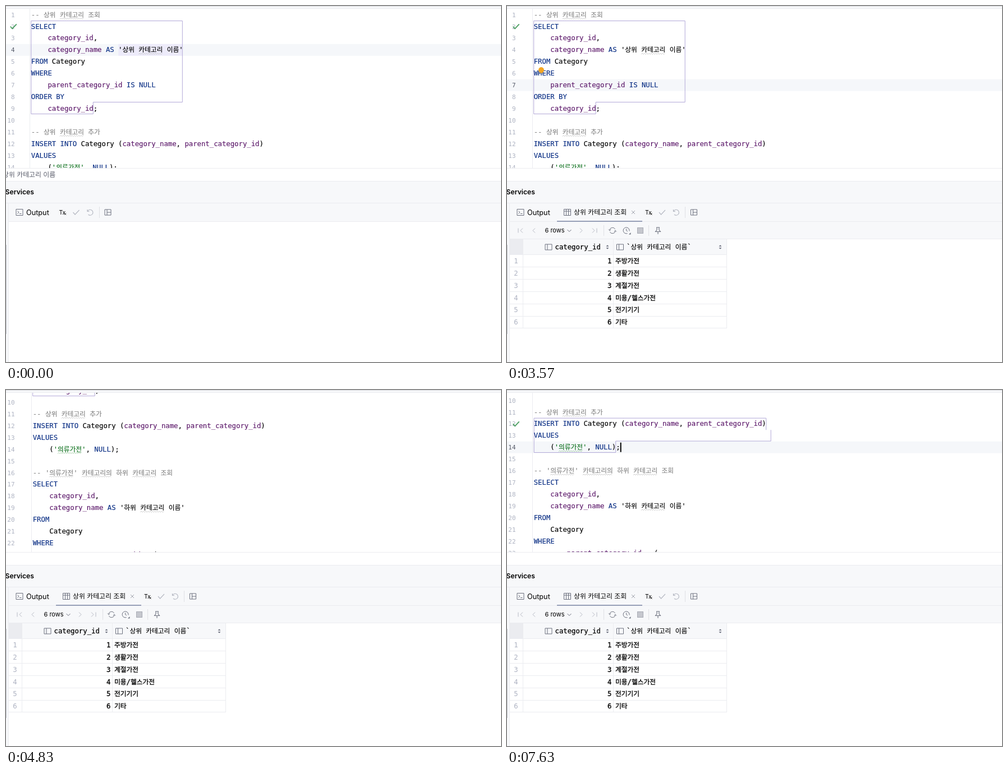
Recreate the animation shown at these times as an HTML page with a canvas. Size 882 by 635 pixels, loop 8 s.

```html
<!DOCTYPE html>
<html lang="ko">
<head>
<meta charset="utf-8">
<style>
  html, body { margin: 0; width: 100%; height: 100%; overflow: hidden; background: #fff; }
  canvas { display: block; }
</style>
</head>
<body>
<canvas id="stage" width="882" height="635"></canvas>
<script>
const ctx = document.getElementById('stage').getContext('2d');

const LOOP = 8000, STEP = 70;
const LINE_HEIGHT = 20.92, EDITOR_TOP = 5, EDITOR_BOTTOM = 289, SCROLL_END = 185.3;
const PANEL = '#f7f8fa', BORDER = '#ebecf0', MUTED = '#b7bac4', ICON = '#6c707e';
const KEYWORD = '#0b2f85', COLUMN = '#5d1a6b', STRING = '#0a6e1a', COMMENT = '#858585';
const SELECTION = '#cacaff', FRAME = '#b3a9d8';
const MONO = '12.29px "DejaVu Sans Mono", monospace';
const LINE_NUMBER = '11px "DejaVu Sans Mono", monospace';
const HANGUL = '11.7px "Noto Sans CJK KR", "Noto Sans CJK", sans-serif';
const UI = 'Inter, "Noto Sans CJK KR", sans-serif';

const code = `-- 상위 카테고리 조회
SELECT
    category_id,
    category_name AS '상위 카테고리 이름'
FROM Category
WHERE
    parent_category_id IS NULL
ORDER BY
    category_id;

-- 상위 카테고리 추가
INSERT INTO Category (category_name, parent_category_id)
VALUES
    ('의류가전', NULL);

-- '의류가전' 카테고리의 하위 카테고리 조회
SELECT
    category_id,
    category_name AS '하위 카테고리 이름'
FROM
    Category
WHERE
        parent_category_id = (`.split('\n');
const rows = ['주방가전', '생활가전', '계절가전', '미용/헬스가전', '전기기기', '기타'];

const clamp = v => Math.min(1, Math.max(0, v));
const between = (t, a, b) => t >= a && t < b;
const lineTop = n => 5.05 + (n - 1) * LINE_HEIGHT;

function rect(x, y, w, h, color) {
  ctx.fillStyle = color;
  ctx.fillRect(x, y, w, h);
}

function stroke(d, color = ICON, x = 0, y = 0, width = 1) {
  ctx.save();
  ctx.translate(x, y);
  ctx.strokeStyle = color;
  ctx.lineWidth = width;
  ctx.stroke(new Path2D(d));
  ctx.restore();
}

function fill(d, color, x = 0, y = 0) {
  ctx.save();
  ctx.translate(x, y);
  ctx.fillStyle = color;
  ctx.fill(new Path2D(d));
  ctx.restore();
}

// A positive `bold` thickens the glyphs by that many pixels.
function label(text, x, y, font, color = '#000', align = 'left', bold = 0) {
  ctx.font = font;
  ctx.fillStyle = ctx.strokeStyle = color;
  ctx.textAlign = align;
  ctx.fillText(text, x, y);
  if (bold) {
    ctx.lineWidth = bold;
    ctx.strokeText(text, x, y);
  }
  ctx.textAlign = 'left';
}

// Draws Latin and Hangul runs in their own fonts and returns the end position.
function monoText(text, x, y, color = '#000', bold = 0) {
  for (const run of text.match(/[가-힣]+|[^가-힣]+/g) || []) {
    const hangul = /[가-힣]/.test(run);
    label(run, x, y, hangul ? HANGUL : MONO, color, 'left', bold);
    const end = x + ctx.measureText(run).width;
    if (hangul && ctx.underlined && /^(카테고리의?|의류가전)$/.test(run)) {
      wave(x, end, y + 2.8, color === STRING ? '#9ccaa0' : '#c4c4c4');
    }
    x = end;
  }
  return x;
}

function wave(x, end, y, color) {
  let d = `M${x} ${y + 1}`;
  for (let i = 1; x + i * 2 <= end; i++) d += `L${x + i * 2} ${y + (i % 2 ? -1 : 1)}`;
  stroke(d, color, 0, 0, .9);
}

function tokenColor(token, line) {
  if (token.startsWith('--')) return COMMENT;
  if (token[0] === "'") return line.includes(' AS ') ? '#000' : STRING;
  if (/^[A-Z]{2,}$/.test(token)) return KEYWORD;
  return /^[a-z]+_/.test(token) ? COLUMN : '#000';
}

function codeLine(line, x, y) {
  for (const token of line.match(/--.*|'[^']*'|\w+|\s+|./g) || []) {
    x = monoText(token, x, y, tokenColor(token, line), .15);
  }
}

function selection(x, first, last, width) {
  rect(x, lineTop(first), 882 - x, (last - first) * LINE_HEIGHT, SELECTION);
  rect(x, lineTop(last), width, LINE_HEIGHT - .5, SELECTION);
}

function editor(t, x) {
  const scroll = SCROLL_END * (1 - (1 - clamp((t - 4060) / 980)) ** 2.59);
  const activeLine = t < 980 ? 4 : t < 6090 ? 7 : 14;
  const secondFrame = t >= 6440;
  const firstSelected = between(t, 2170, 2730), secondSelected = between(t, 6650, 7560);

  ctx.save();
  ctx.beginPath();
  ctx.rect(0, EDITOR_TOP, 882, EDITOR_BOTTOM - EDITOR_TOP);
  ctx.clip();
  ctx.translate(0, -scroll);

  rect(0, lineTop(activeLine), 882, LINE_HEIGHT, '#f5f7fa');
  if (activeLine === 4) rect(x + 155.5, lineTop(4), 114, LINE_HEIGHT, '#edebfa');
  rect(Math.round(x - 3), 0, 1, 600, BORDER);
  if (firstSelected) selection(x, 2, 9, 110.5);
  if (secondSelected) selection(x, 12, 14, 146);

  const frameColor = firstSelected || secondSelected ? '#b9b1e6' : FRAME;
  if (secondFrame) {
    stroke('M414 256.5V235.5H.5V296.8H146V276.4H422.5V256.5', frameColor, x, 0);
  } else {
    stroke('M0 26.5H269.5V171.5H110.5V192.5H0Z', frameColor, x, 0);
  }

  ctx.underlined = true;
  code.forEach((line, i) => {
    const y = lineTop(i + 1) + 14.6;
    label(i + 1, 15.5, y, LINE_NUMBER, i + 1 === activeLine ? '#555a68' : '#aeb3c2', 'right');
    codeLine(line, x, y);
  });
  ctx.underlined = false;

  const checked = t < 7560 ? 2 : 12;
  stroke('M-5 0L-1.5 4L6 -4', '#4c9f62', x - 32, lineTop(checked) + 10.5, 1.8);

  if (between(t, 2100, 2170) || between(t, 3570, 6440)) {
    fill('M-3 3.5A5 5 0 1 1 3 3.5L2.5 5H-2.5Z', '#f5a623', x + 13.3, 114.5);
    rect(x + 11.3, 119.5, 4, 1.5, '#8c8c8c');
  }
  if (between(t, 2730, 3220) || between(t, 3780, 4130)) {
    rect(x + 222, lineTop(7) + 2, 2, 17, '#000');
  }
  if (between(t, 6090, 6440) || t >= 7560) {
    rect(x + 154, lineTop(14) + 2, 2, 17, '#000');
  }
  ctx.restore();
}

function pointer(t) {
  let x, y;
  if (between(t, 210, 1960)) {
    const rest = (1 - clamp((t - 210) / 770)) ** 2;
    x = 264.5 + 35 * rest;
    y = 141 + 495 * rest;
  } else if (between(t, 5460, 6440)) {
    const u = clamp((t - 5460) / 630), v = 1 - u;
    x = v * v * 331 + 2 * u * v * 301 + u * u * 202;
    y = v * v * 200 + 2 * u * v * 67 + u * u * 102;
  } else return;
  if (y > EDITOR_BOTTOM - 9) return;
  const beam = 'M-3.5 -7.5Q0 -7.5 0 -5.5Q0 -7.5 3.5 -7.5M0 -5.5V5.5M-3.5 7.5Q0 7.5 0 5.5Q0 7.5 3.5 7.5M-2 2.5H2';
  stroke(beam, '#fff', x, y, 3);
  stroke(beam, '#111', x, y, 1.3);
}

function panel(hasResult) {
  rect(0, 0, 882, 4, PANEL);
  rect(0, 0, 882, 1, '#dcdde0');
  rect(0, 4, 882, 1, BORDER);
  rect(0, 289, 882, 1, BORDER);
  rect(0, 312, 882, 73, PANEL);
  for (const y of [312, 351, 384]) rect(0, y, 882, 1, BORDER);
  rect(0, 352, 4, 283, PANEL);
  rect(4, 352, 1, 283, BORDER);
  rect(0, 426, 1, 159, '#c3c6cd');

  label('Services', -1.5, 336.3, '600 12.2px ' + UI);
  stroke('M-6 -5.5H6V5.5H-6ZM-3.5 -2.5L-1 0L-3.5 2.5M0 2.5H3.5', ICON, 24, 368);
  label('Output', 36, 372.5, '12.7px ' + UI);

  const shift = hasResult ? 151.5 : 0;
  label('Tx', 94.5 + shift, 372, '10.5px ' + UI);
  stroke('M0 0L3 3M3 0L0 3', '#222', 104 + shift, 369.5);
  stroke('M-5.5 0L-2 4L5.5 -4', MUTED, 125 + shift, 368, 1.2);
  stroke('M-5 -5V-1.5H-1.5M-4.7 -1.8A5 5 0 1 1 -3.5 4', MUTED, 150 + shift, 368, 1.2);
  rect(Math.round(165.5 + shift), 358, 1, 20, '#dfe1e5');
  stroke('M-5.5 -5H5.5V5H-5.5ZM-1.5 -5V5M-1.5 0H5.5', ICON, 181.5 + shift, 368);
}

function sorter(x) {
  fill('M-2.5 -1L0 -3.8L2.5 -1ZM-2.5 1L0 3.8L2.5 1Z', '#6c707e', x, 430);
}

function results() {
  stroke('M-6 -5.5H6V5.5H-6ZM-6 -2H6M-2 -5.5V5.5M2 -5.5V5.5', ICON, 107.5, 368);
  label('상위 카테고리 조회', 119, 372, '11.9px ' + UI);
  stroke('M-3 -3L3 3M3 -3L-3 3', '#a0a3ad', 225, 368);
  rect(89, 383, 152, 2, '#979fb8');

  rect(5, 385, 877, 30, PANEL);
  rect(5, 415, 877, 1, BORDER);
  stroke('M-4 -4V4M4 -4L0 0L4 4', MUTED, 24, 400.5);
  stroke('M2 -4L-2 0L2 4', MUTED, 48, 400.5);
  label('6 rows', 67.5, 404.3, '11px ' + UI);
  stroke('M-3.5 -1.5L0 2L3.5 -1.5', ICON, 111, 400.5);
  stroke('M-2 -4L2 0L-2 4', MUTED, 132, 400.5);
  stroke('M-4 -4L0 0L-4 4M4 -4V4', MUTED, 156, 400.5);
  rect(172, 391, 1, 19, '#dfe1e5');
  stroke('M-5 0A5 5 0 0 1 4.5 -2.3M5 0A5 5 0 0 1 -4.5 2.3M-7 -2L-5 0L-3 -2M7 2L5 0L3 2', ICON, 188, 400.5);
  stroke('M5.5 1A5.5 5.5 0 1 0 2 5.1M0 -3V0L2.5 1.5', ICON, 212.5, 400.5);
  fill('M4.5 7H8V3.5Z', ICON, 212.5, 400.5);
  rect(232, 395, 11, 11, '#a8abb4');
  rect(233, 396, 9, 9, '#c5c7ce');
  rect(252, 391, 1, 19, '#dfe1e5');
  stroke('M-3 -5.5H3M-2 -5.5V-1L-4.5 2H4.5L2 -1V-5.5M0 2V6.5', ICON, 269, 400.5, 1.1);

  rect(5, 416, 386, 28, PANEL);
  rect(5, 416, 23, 28, BORDER);
  stroke('M-6 -5H6V5H-6ZM-2 -5V5', ICON, 74, 430);
  monoText('category_id', 85.5, 434.3, '#000', .25);
  sorter(179);
  stroke('M-6 -5H6V5H-6ZM-2 -5V5', ICON, 201.5, 430);
  monoText('`상위 카테고리 이름`', 213, 434.3, '#000', .15);
  sorter(380);

  rows.forEach((name, i) => {
    const y = 458.8 + i * 21.9;
    label(i + 1, 16, y, MONO, '#aeb3c2', 'center');
    label(i + 1, 186.5, y, MONO, '#000', 'right', .3);
    monoText(name, 193, y, '#000', .3);
  });
  for (let i = 0; i <= rows.length; i++) rect(5, Math.round(443 + i * 21.9), 387, 1, BORDER);
  for (const x of [28, 189, 391]) rect(x, 416, 1, 159, BORDER);
}

function draw(now) {
  const t = Math.floor(now % LOOP / STEP) * STEP;
  const hasResult = t >= 2730;
  rect(0, 0, 882, 635, '#fff');
  editor(t, hasResult ? 47.7 : 44.8);
  panel(hasResult);
  if (t < 1190) label('상위 카테고리 이름', -6, 304.5, '11.9px ' + UI, '#5a5d6b');
  if (hasResult) results();
  pointer(t);
}

const start = performance.now();
function tick() {
  draw(performance.now() - start);
  requestAnimationFrame(tick);
}
tick();
</script>
</body>
</html>
```
